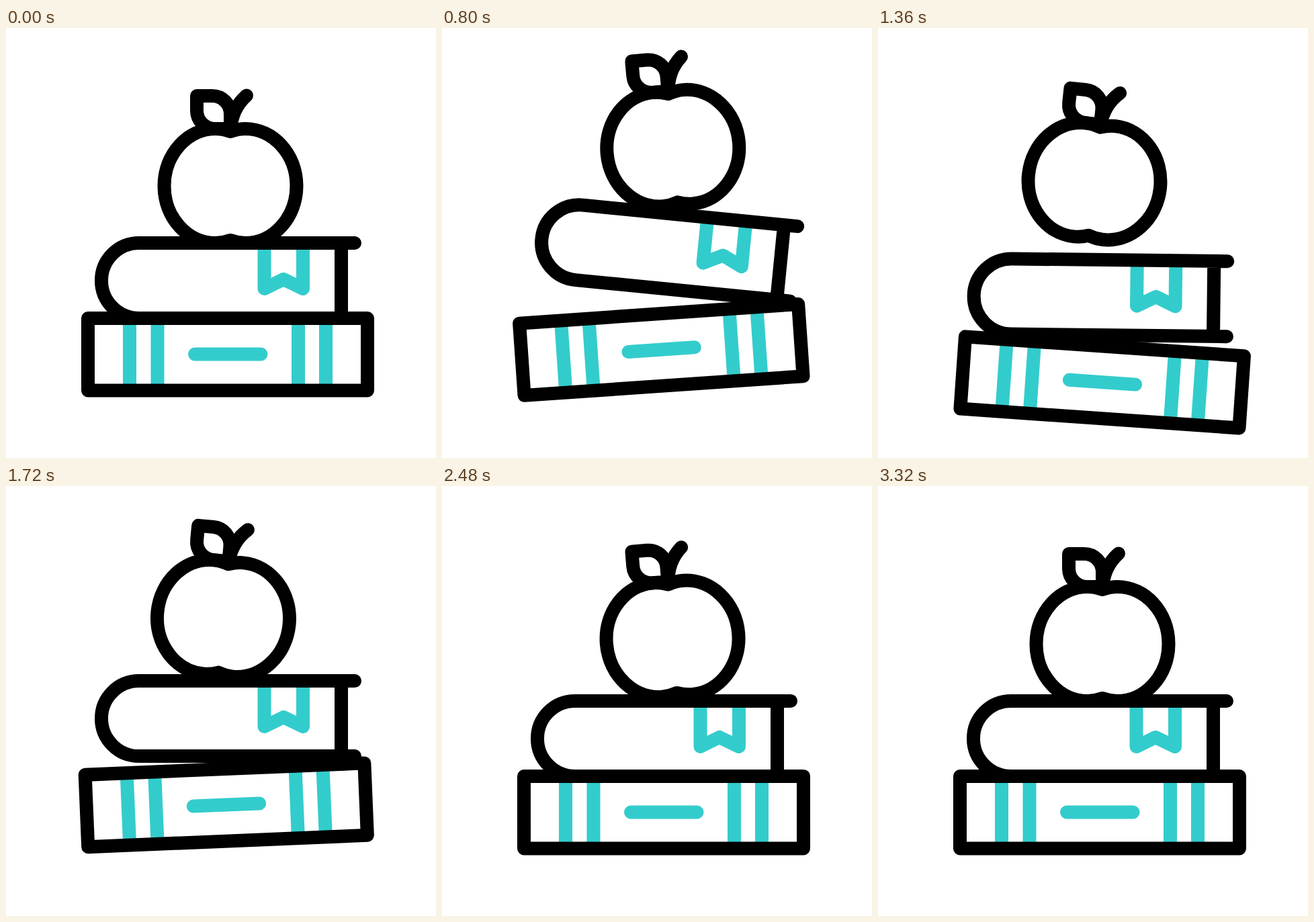
Write an HTML page that moves like this. It is 640 by 640 pixels and loops after 3560 ms.

```html
<!DOCTYPE html>
<html lang="en">
<head>
<meta charset="utf-8">
<title>Apple on bouncing books</title>
<style>
  html, body { margin: 0; width: 100%; height: 100%; overflow: hidden; background: #fff; }
  svg { display: block; width: 100vw; height: 100vh; }
  g { fill: none; stroke: #000; stroke-width: 20; stroke-linecap: round; stroke-linejoin: round; }
  .accent { stroke: #33cccc; }
  .flat { stroke-linecap: butt; }
</style>
</head>
<body>
<svg viewBox="0 0 640 640">
  <g id="bottomBook">
    <path class="accent flat" d="M184 435V535M225.5 435V535M435 435V535M476 435V535"/>
    <path class="accent" d="M281 485.5H379.5"/>
    <rect x="122" y="432" width="416" height="107.5"/>
  </g>
  <g id="middleBook">
    <path class="accent flat" d="M384.5 322V388L413 374L442 388V322"/>
    <path d="M519 320H198A56 56 0 0 0 198 432H519M499 320V432"/>
  </g>
  <g id="apple">
    <path d="M334 154Q322 150 312 150C270 150 235.5 188 235.5 235S270 320 312 320
             Q323 320 334 316Q345 320 356 320C398 320 432.5 282 432.5 235S398 150 356 150Q346 150 334 154Z"/>
    <path d="M284 101H307A27 27 0 0 1 334 128V150H311A27 27 0 0 1 284 123Z"/>
    <path d="M334 152Q336 120 358 100.5"/>
  </g>
</svg>
<script>
const LOOP = 3560;
const STEP = 20;

const ease = u => (1 - Math.cos(Math.PI * u)) / 2;
const mix = (a, b, u) => a + (b - a) * ease(u);

// Eases from rest through one peak per beat, then settles back to rest.
function swing(time, start, beat, settle, ...peaks) {
  const beats = (time - start) / beat;
  if (beats <= 0) return 0;
  const index = Math.floor(beats);
  if (index < peaks.length) return mix(index ? peaks[index - 1] : 0, peaks[index], beats - index);
  const settled = (time - start - beat * peaks.length) / settle;
  return mix(peaks[peaks.length - 1], 0, Math.min(settled, 1));
}

function place(id, pivot, lift, tilt) {
  document.getElementById(id).setAttribute("transform", `translate(0 ${lift}) rotate(${tilt} ${pivot})`);
}

function draw(time) {
  place("bottomBook", "330 539",
    swing(time, 300, 470, 790, -7.5, 51, -11),
    swing(time, 385, 495, 630, -4.2, 4, -4.1));

  place("middleBook", "330 432",
    swing(time, 340, 510, 630, -45, 25, -43.5),
    swing(time, 300, 560, 640, 5.8));

  const nod = swing(time, 370, 590, 720, -6, 9.8, -13.5);
  const overshoot = swing(time, 2140, 720, 460, 6);
  place("apple", "334 122",
    swing(time, 440, 505, 670, -69, -1, -67),
    nod + overshoot);
}

const start = performance.now();

function tick() {
  const elapsed = (performance.now() - start) % LOOP;
  draw(Math.floor(elapsed / STEP) * STEP);
  requestAnimationFrame(tick);
}

tick();
</script>
</body>
</html>
```
